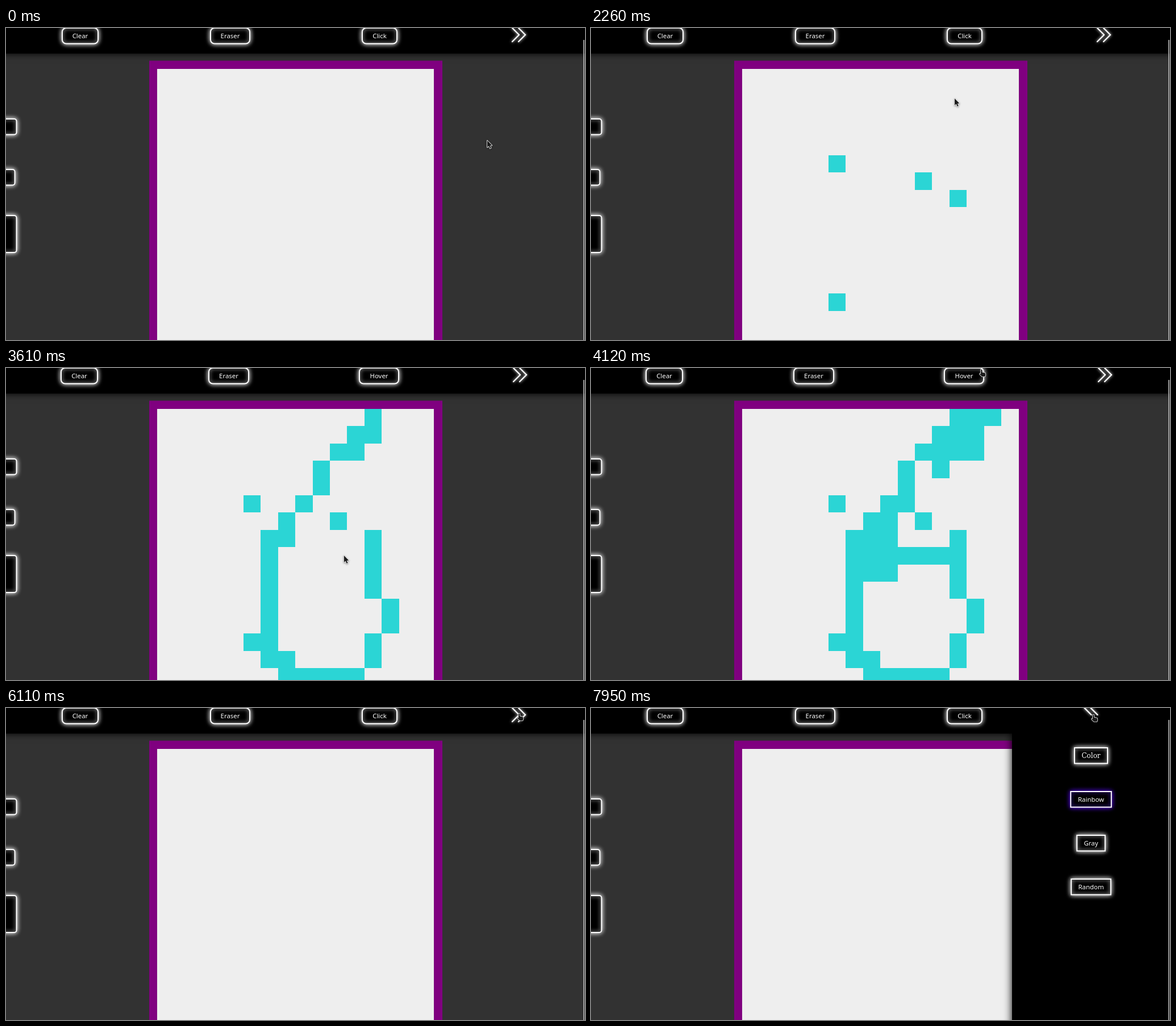
An HTML page with a canvas that plays this animation: 1019x549 px, repeating every 8000 ms.

```html
<!DOCTYPE html>
<html lang="en">
<head>
<meta charset="utf-8">
<title>Sketch pad</title>
<style>
html, body { margin: 0; width: 100%; height: 100%; overflow: hidden; background: #323232; }
canvas { display: block; width: 1019px; height: 549px; }
</style>
</head>
<body>
<canvas id="stage" width="1019" height="549"></canvas>
<script>
const W = 1019, H = 549, LOOP = 8000;
const ctx = document.getElementById('stage').getContext('2d');
const SANS = '11.4px "Noto Sans", "Open Sans", sans-serif';
const SERIF = '12px "DejaVu Serif", "Noto Serif", serif';
const PANEL_X = 741, CLEAR_AT = 5330, LAG = 45;

const cellX = c => Math.round(266 + 30.4 * c);
const cellY = r => Math.round(72 + 30.4 * r);

// A stroke steps from cell to cell: u d l r straight, q e z diagonal
const STEP = { u: [0, -1], d: [0, 1], l: [-1, 0], r: [1, 0], q: [-1, -1], e: [1, -1], z: [-1, 1] };

function stroke(from, to, col, row, moves = '') {
  const list = [{ at: from, col, row }];
  [...moves].forEach((m, i) => {
    col += STEP[m][0];
    row += STEP[m][1];
    list.push({ at: from + (to - from) * (i + 1) / moves.length, col, row });
  });
  return list;
}

const clicked = [
  stroke(1340, 1340, 12, 7), stroke(1420, 1420, 10, 6),
  stroke(1680, 1680, 5, 5), stroke(2000, 2000, 5, 13)
].flat();

const hovered = [
  stroke(2600, 3080, 12, 0, 'dldlzdzzdldddd'),
  stroke(3120, 3330, 6, 12, 'ddrdrrrre'),
  stroke(3410, 3960, 12, 13, 'euquulllzluruue'),
  stroke(4000, 4100, 11, 3, 'eruur')
].flat();

const cells = [...clicked, ...hovered];

// Pointer path: time, x, y; hovered cells are visited on the way
const path = [
  [170, 847, 198], [550, 831, 261], [650, 831, 261], [1170, 642, 307],
  [1340, 642, 307], [1420, 585, 272], [1500, 440, 241], [1690, 440, 241],
  [1960, 433, 482], [2020, 433, 482], [2260, 640, 124], [2480, 668, 23],
  [2530, 668, 23], [4120, 687, 3], [4190, 665, 10], [4270, 665, 10],
  [4450, 590, 60], [4650, 410, 85], [4850, 240, 70], [5010, 134, 31],
  [5100, 140, 22], [5330, 140, 22], [5600, 480, 44], [5900, 903, 10],
  [6180, 903, 10], [6480, 885, 46], [6600, 885, 46], [6880, 889, 85],
  [7440, 889, 85], [7950, 884, 12],
  ...hovered.map(c => [c.at - LAG, cellX(c.col + .5), cellY(c.row + .5)])
].sort((a, b) => a[0] - b[0]);

function pointerAt(t) {
  const i = path.findIndex(k => k[0] > t);
  if (i === 0) return path[0].slice(1);
  if (i < 0) return path.at(-1).slice(1);
  const a = path[i - 1], b = path[i], p = (t - a[0]) / (b[0] - a[0]);
  return [a[1] + (b[1] - a[1]) * p, a[2] + (b[2] - a[2]) * p];
}

function rect(x, y, w, h, color) {
  ctx.fillStyle = color;
  ctx.fillRect(x, y, w, h);
}

function glow(color, blur) {
  ctx.shadowColor = color;
  ctx.shadowBlur = blur;
}

function label(text, x, y, font = SANS, color = '#fff') {
  ctx.font = font;
  ctx.fillStyle = color;
  ctx.textAlign = 'center';
  ctx.fillText(text, x, y);
}

function button(x1, y1, x2, y2, radius, halo = '#fff', blur = 10) {
  ctx.save();
  ctx.beginPath();
  ctx.roundRect(x1 + 1, y1 + 1, x2 - x1 - 2, y2 - y1 - 2, radius);
  ctx.fillStyle = '#000';
  ctx.strokeStyle = '#fff';
  ctx.lineWidth = 2;
  glow(halo, blur);
  ctx.fill();
  glow(halo, blur * .7);
  ctx.stroke();
  ctx.restore();
}

function polyline(points, close) {
  ctx.beginPath();
  points.forEach(([x, y]) => ctx.lineTo(x, y));
  if (close) ctx.closePath();
}

function chevrons(x, y, dir) {
  ctx.save();
  ctx.strokeStyle = '#fff';
  ctx.lineWidth = 2.2;
  ctx.lineCap = 'round';
  glow('#fff', 5);
  for (const c of [x - 5.5, x + 5.5]) {
    polyline([[c - 6 * dir, y - 12], [c + 6 * dir, y], [c - 6 * dir, y + 12]]);
    ctx.stroke();
  }
  ctx.restore();
}

function headerButtons(hover) {
  return hover
    ? [['Clear', 96, 162], ['Eraser', 356, 428], ['Hover', 621, 692]]
    : [['Clear', 98, 163], ['Eraser', 359, 430], ['Click', 626, 689]];
}

function drawBoard(t) {
  rect(0, 0, W, H, '#323232');
  rect(252, 57.5, 516, H, '#800080');
  rect(266, 72, 487, H, '#eee');
  if (t < CLEAR_AT) {
    for (const { at, col, row } of cells) {
      const x = cellX(col), y = cellY(row);
      if (t >= at) rect(x, y, cellX(col + 1) - x, cellY(row + 1) - y, '#2bd5d5');
    }
  }
  button(-60, 159, 19.5, 188.5, 4);
  button(-60, 248, 16.5, 277.5, 4);
  button(-60, 329, 19.5, 396, 4);
}

function drawHeader(hover) {
  ctx.save();
  glow('#000', 12);
  rect(-20, -20, W + 40, 65, '#000');
  ctx.restore();
  for (const [text, x1, x2] of headerButtons(hover)) {
    button(x1, -1, x2, 28.5, 7);
    label(text, (x1 + x2) / 2, 18);
  }
  chevrons(hover ? 904.5 : 902.5, 12, 1);
}

function drawPanel(t, x, colorHot) {
  if (x >= W) return;
  ctx.save();
  glow('#000', 14);
  rect(x, -20, W - x + 40, H + 40, '#000');
  ctx.restore();

  ctx.save();
  ctx.translate(x - PANEL_X, 0);
  chevrons(880, 0, -1);
  const p = Math.max(0, Math.min(1, (t - 6990) / 960));
  const halo = `hsl(${246 + 14 * p}, 90%, ${42 + 8 * p}%)`;
  const rows = [['Color', 30], ['Rainbow', 36.75], ['Gray', 25.75], ['Random', 35.75]];
  rows.forEach(([text, half], i) => {
    const y = 69 + 77 * i, hot = colorHot && i === 0;
    if (hot) rect(880 - half, y, half * 2, 29.5, '#fff');
    else if (i === 1) button(880 - half, y, 880 + half, y + 29.5, 0, halo, 7 + 3 * p);
    else button(880 - half, y, 880 + half, y + 29.5, 0);
    label(text, 880, y + 19, i ? SANS : SERIF, hot ? '#000' : '#fff');
  });
  ctx.restore();
}

const ARROW = [[0, 0], [0, 12], [2.7, 9.6], [4.7, 14], [6.7, 13], [4.8, 9], [8.3, 8.6]];
const HAND = [[-1, 0], [1, 0], [1.4, 4.4], [7, 6], [7.4, 9], [6.4, 12],
  [1, 12], [-3, 8], [-2.6, 6.6], [-1, 7.6]];

function drawPointer(x, y, hand) {
  ctx.save();
  ctx.translate(x, y);
  ctx.lineJoin = 'round';
  ctx.lineWidth = 1.7;
  ctx.strokeStyle = '#eee';
  ctx.fillStyle = '#1c1c1c';
  polyline(hand ? HAND : ARROW, true);
  glow('rgba(0,0,0,.45)', 3);
  ctx.shadowOffsetY = 1;
  ctx.stroke();
  glow('transparent', 0);
  ctx.fill();
  ctx.restore();
}

function panelLeft(t) {
  const p = Math.max(0, Math.min(1, (t - 6070) / 410));
  const eased = p < .5 ? 2 * p * p : 1 - 2 * (1 - p) ** 2;
  return W + 14 - (W + 14 - PANEL_X) * eased;
}

function draw(t) {
  const hover = t >= 2530 && t < 4270;
  const left = panelLeft(t);
  const [x, y] = pointerAt(t);
  const colorHot = left <= PANEL_X && x > 850 && x < 910 && y > 69 && y < 98;
  const onHeader = y < 29 && headerButtons(hover).some(b => x > b[1] && x < b[2]);
  const onIcon = y < 26 && x > 866 && x < 918;

  drawBoard(t);
  drawHeader(hover);
  drawPanel(t, left, colorHot);
  rect(1016, 21, 2, H, '#a0a0a0');
  drawPointer(x, y, onHeader || onIcon || colorHot);
}

let start;
function tick(now) {
  start ??= now;
  draw((now - start) % LOOP);
  requestAnimationFrame(tick);
}
draw(0);
requestAnimationFrame(tick);
</script>
</body>
</html>
```
